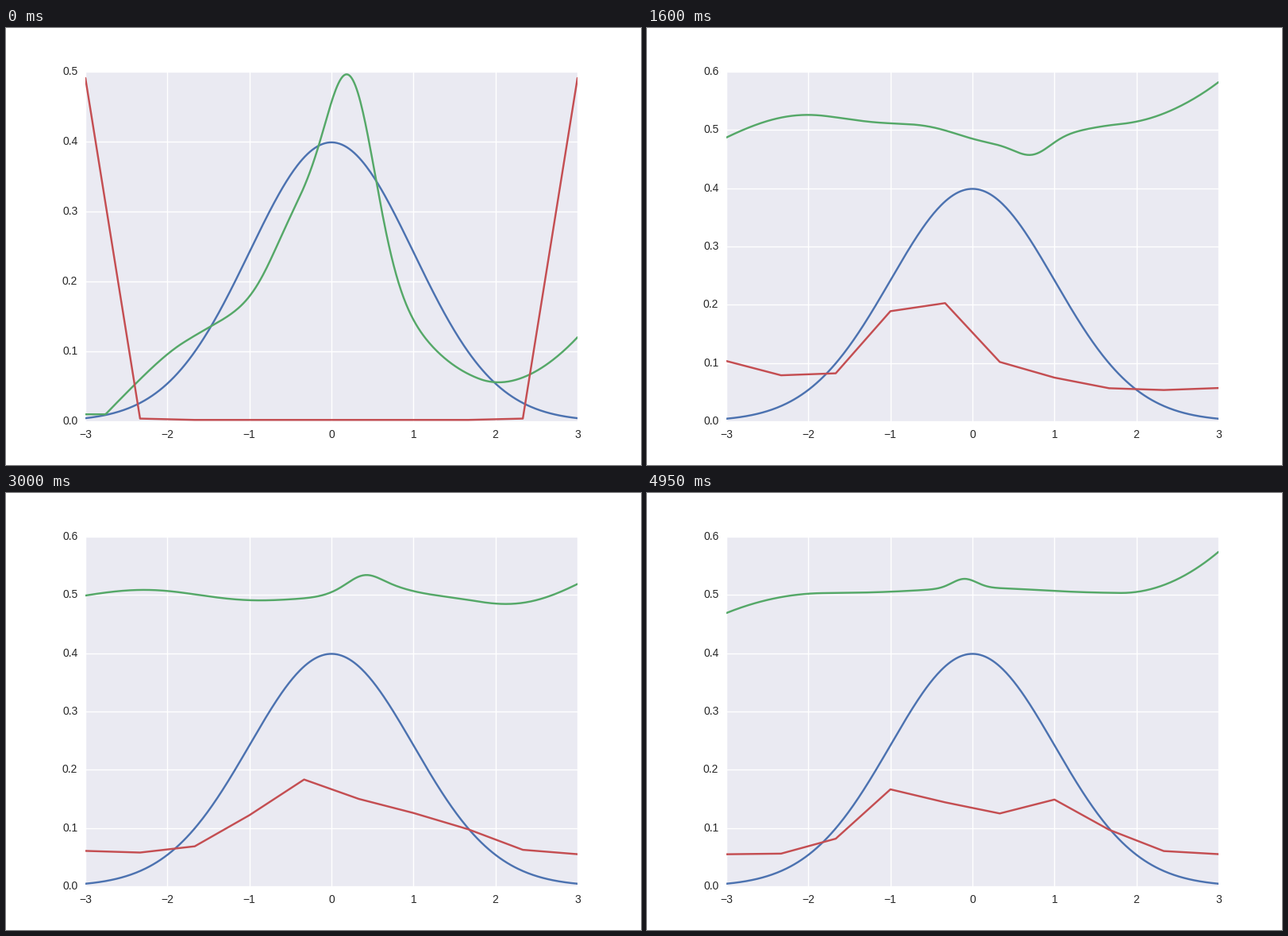
A matplotlib script that plays this animation: 800 by 550 pixels, repeating every 5000 ms.

```python
import numpy as np
import matplotlib.pyplot as plt
from matplotlib.animation import FuncAnimation
from matplotlib.ticker import FormatStrFormatter

FRAMES, INTERVAL = 100, 50
BLUE, GREEN, RED = "#4C72B0", "#55A868", "#C44E52"
INK, PANEL = "#262626", "#EAEAF2"

plt.rcParams["font.family"] = "Liberation Sans"
plt.rcParams["font.size"] = 10
plt.rcParams["ytick.alignment"] = "center"

x = np.linspace(-3, 3, 400)
bins = np.linspace(-3, 3, 10)


def bell(at, centre, width, height):
    return height * np.exp(-((at - centre) / width) ** 2 / 2)


def density(floor, *bells):
    """Sampled histogram: a floor with a few bells."""
    return floor + sum(bell(bins, *b) for b in bells)


def decision(*bells, level=.503, left=0, right=0):
    """Smooth curve: a level with bells, bending quadratically at the ends."""
    end = np.clip((np.abs(x) - 1.8) / 1.2, 0, None) ** 2
    return (level + np.where(x < 0, left, right) * end
            + sum(bell(x, *b) for b in bells))


# step, decision curve, density; each bell is (centre, width, height)
poses = [
    (0,
     decision((-1.6, .6, .055), (-.45, .28, .06), (0, .8, .2),
              (.22, .3, .253), level=.045, left=-.07, right=.075),
     density(.002, (-3, .2, .489), (3, .2, .489))),
    (14,
     decision((.15, .5, -.04), (.1, .2, .104), (2.65, .7, -.125),
              level=.492, left=-.119),
     density(.009, (2.15, .48, .48))),
    (25,
     decision((-2.1, .7, .045), (.3, .6, -.053), (.75, .2, -.022),
              (2.2, .6, .029), left=-.016, right=.116),
     density(.03, (-3, .35, .075), (-.65, .53, .295))),
    (40,
     decision((-.5, .4, .024), (.72, .22, -.027), (2.2, .4, -.011),
              left=-.041, right=.022),
     density(.083, (-2.33, .4, .033), (.15, .8, .05))),
    (51,
     decision((-2.3, .6, .022), (-.9, .5, -.011), (.45, .36, .043),
              (2.3, .6, -.044)),
     density(.055, (-.3, .5, .152), (1, .45, .092))),
    (70,
     decision((-.05, .25, -.008), (.4, .18, .028), (1, .75, -.02),
              left=-.027, right=.068),
     density(.06, (-.7, .6, .1), (1, .7, .07))),
    (99,
     decision((-.1, .15, .016), (.1, .7, .009), left=-.034, right=.071),
     density(.055, (-.8, .5, .12), (.9, .6, .095))),
]

# Slight training noise, zero at every pose
rng = np.random.default_rng(4)
wave = rng.normal(0, .005, (FRAMES, 2))
shake = rng.normal(0, .06, (FRAMES, len(bins)))


def state(n):
    """Decision curve and density at a step."""
    i = max(j for j in range(len(poses) - 1) if poses[j][0] <= n)
    (s0, d0, g0), (s1, d1, g1) = poses[i], poses[i + 1]
    u = (n - s0) / (s1 - s0)
    noise = np.sin(np.pi * u)
    ripple = wave[n, 0] * np.sin(1.2 * x) + wave[n, 1] * np.cos(2.3 * x)
    d = d0 + (d1 - d0) * u + noise * ripple
    g = (g0 + (g1 - g0) * u) * (1 + noise * shake[n])
    return np.maximum(d, .01), g


fig = plt.figure(figsize=(8, 5.5), dpi=100, facecolor="white")
ax = fig.add_axes([.125, .1, .775, .8], facecolor=PANEL)
for side in ax.spines.values():
    side.set_visible(False)
ax.set_axisbelow(True)
ax.grid(True, color="white", linewidth=1, linestyle="-")
ax.tick_params(length=0, pad=7, labelcolor=INK)
ax.set_xlim(-3, 3)
ax.set_xticks(range(-3, 4))
ax.yaxis.set_major_formatter(FormatStrFormatter("%.1f"))

style = dict(linewidth=1.75, solid_capstyle="round")
ax.plot(x, bell(x, 0, 1, 1 / np.sqrt(2 * np.pi)), color=BLUE, **style)
green, = ax.plot([], [], color=GREEN, **style)
red, = ax.plot([], [], color=RED, **style)


def draw(n):
    d, g = state(n)
    green.set_data(x, d)
    red.set_data(bins, g)
    tenths = int(np.ceil(10 * max(d.max(), g.max(), .4)))
    ax.set_yticks(np.arange(tenths + 1) / 10)
    ax.set_ylim(0, tenths / 10)
    return green, red


anim = FuncAnimation(fig, draw, frames=FRAMES, interval=INTERVAL,
                     repeat=True, repeat_delay=0, blit=False)
plt.show()
```
